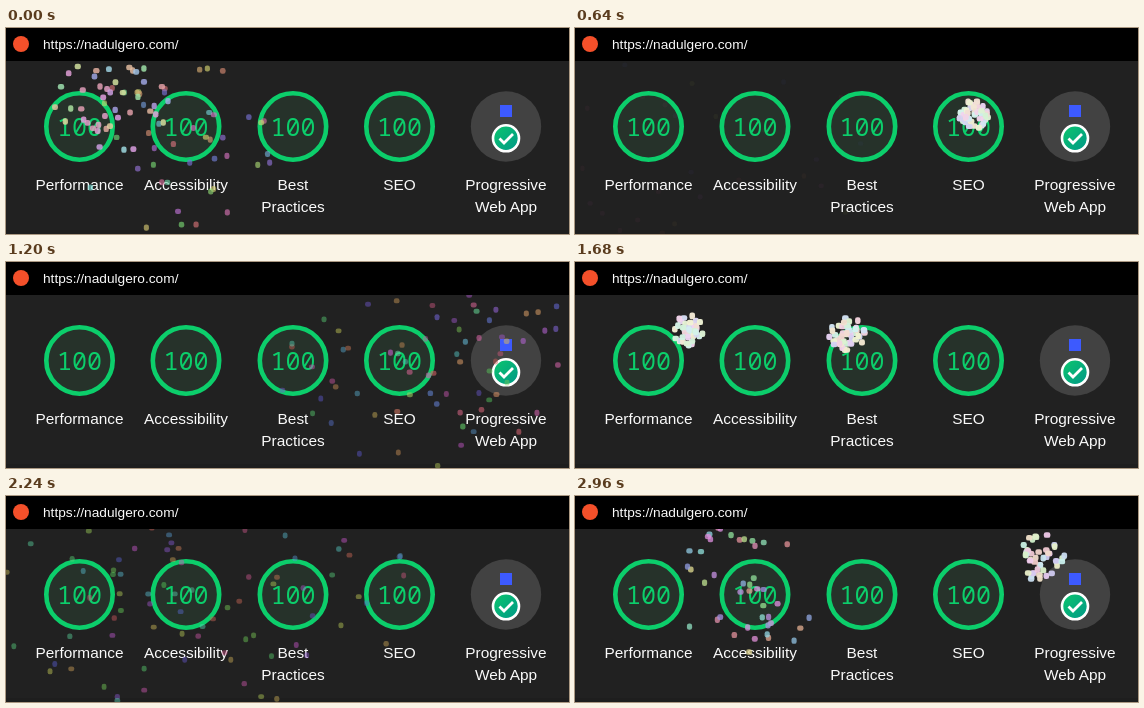
Write an HTML page with a canvas that moves like this. It is 563 px wide and 206 px high and loops after 3040 ms.

```html
<!DOCTYPE html>
<html lang="en">
<head>
<meta charset="utf-8">
<title>Audit scores</title>
<style>
  html, body { margin: 0; width: 100%; height: 100%; overflow: hidden; background: #212121; }
  svg, canvas { position: absolute; left: 0; top: 0; }
  text { font-family: "Liberation Sans", Arial, sans-serif; fill: #fafafa; }
  .label { font-size: 15.4px; text-anchor: middle; }
  .score { font: 25px "Noto Sans Mono", monospace; fill: #0cce6b; text-anchor: middle; }
  .ring { fill: #26322a; stroke: #0cce6b; stroke-width: 4.6; }
</style>
</head>
<body>
<svg id="stage" width="563" height="206">
  <defs>
    <linearGradient id="green" x1="0" y1="0" x2="1" y2="1">
      <stop stop-color="#0cc76c"/>
      <stop offset="1" stop-color="#009688"/>
    </linearGradient>
  </defs>
  <rect width="563" height="33"/>
  <rect y="202" width="563" height="4" fill="#1e1e1e"/>
  <circle cx="15" cy="16" r="8" fill="#f4502a"/>
  <text x="37" y="20.5" font-size="13.7">https://nadulgero.com/</text>
  <circle cx="500" cy="98.5" r="35.2" fill="#424242"/>
  <rect x="494" y="77" width="12" height="12" fill="#3d5afe"/>
  <circle cx="500" cy="110.3" r="13" fill="url(#green)" stroke="#fff" stroke-width="2.6"/>
  <path d="M493.5 110.5l4.5 4.5 9-9" fill="none" stroke="#fff" stroke-width="2.8"/>
</svg>
<canvas id="confetti" width="563" height="206"></canvas>
<script>
const LOOP = 3040, STEP = 80, LIFE = 960, COUNT = 44;
const stage = document.getElementById('stage');
const ctx = document.getElementById('confetti').getContext('2d');

function add(tag, attrs, text = '') {
  const el = document.createElementNS('http://www.w3.org/2000/svg', tag);
  for (const key in attrs) el.setAttribute(key, attrs[key]);
  el.textContent = text;
  stage.append(el);
}

const columns = [
  [73.5, 'Performance'], [180, 'Accessibility'], [287, 'Best', 'Practices'],
  [393.5, 'SEO'], [500, 'Progressive', 'Web App']
];
columns.forEach(([x, ...lines], i) => {
  if (i < 4) {
    add('circle', { class: 'ring', cx: x, cy: 98.5, r: 33.2 });
    add('text', { class: 'score', x, y: 108 }, '100');
  }
  lines.forEach((line, n) => add('text', { class: 'label', x, y: 162 + 22 * n }, line));
});

// Start time (ms) and origin of each burst
const bursts = [
  [-480, 170, 112], [-290, 106, 70], [560, 400, 88], [660, 468, 68],
  [1600, 114, 69], [1590, 272, 73], [2600, 173, 90], [2835, 466, 63]
];

function seeded(seed) {
  return () => {
    seed = (seed + 0x6d2b79f5) | 0;
    let t = Math.imul(seed ^ (seed >>> 15), 1 | seed);
    t = (t + Math.imul(t ^ (t >>> 7), 61 | t)) ^ t;
    return ((t ^ (t >>> 14)) >>> 0) / 2 ** 32;
  };
}

function drawBurst([start, x, y], index, time) {
  const age = time - start;
  if (age <= 0 || age >= LIFE) return;
  const random = seeded(index + 1);
  const s = age / 1000;
  const size = 6.2 - 1.2 * s;
  const light = Math.max(58, 94 - 62 * s);
  ctx.globalAlpha = 1 - (age / LIFE) ** 1.5;
  for (let i = 0; i < COUNT; i++) {
    const angle = random() * 2 * Math.PI;
    const reach = 200 * random() ** 0.55 * s;
    const px = x + Math.cos(angle) * reach;
    const py = y + Math.sin(angle) * reach * 0.95 - 15 * s + 60 * s * s;
    const turn = Math.sin(random() * 6 + s * 5) * 0.6;
    const w = size + turn, h = size - turn;
    ctx.fillStyle = `hsl(${random() * 360} 55% ${light}%)`;
    ctx.beginPath();
    ctx.roundRect(px - w / 2, py - h / 2, w, h, 2.2);
    ctx.fill();
  }
}

// Confetti stays below the address bar
ctx.beginPath();
ctx.rect(0, 33, 563, 173);
ctx.clip();

const begin = performance.now();
function frame() {
  const elapsed = (performance.now() - begin) % LOOP;
  const time = Math.floor(elapsed / STEP) * STEP;
  ctx.clearRect(0, 0, 563, 206);
  bursts.forEach((burst, i) => drawBurst(burst, i, time));
  requestAnimationFrame(frame);
}
frame();
</script>
</body>
</html>
```
